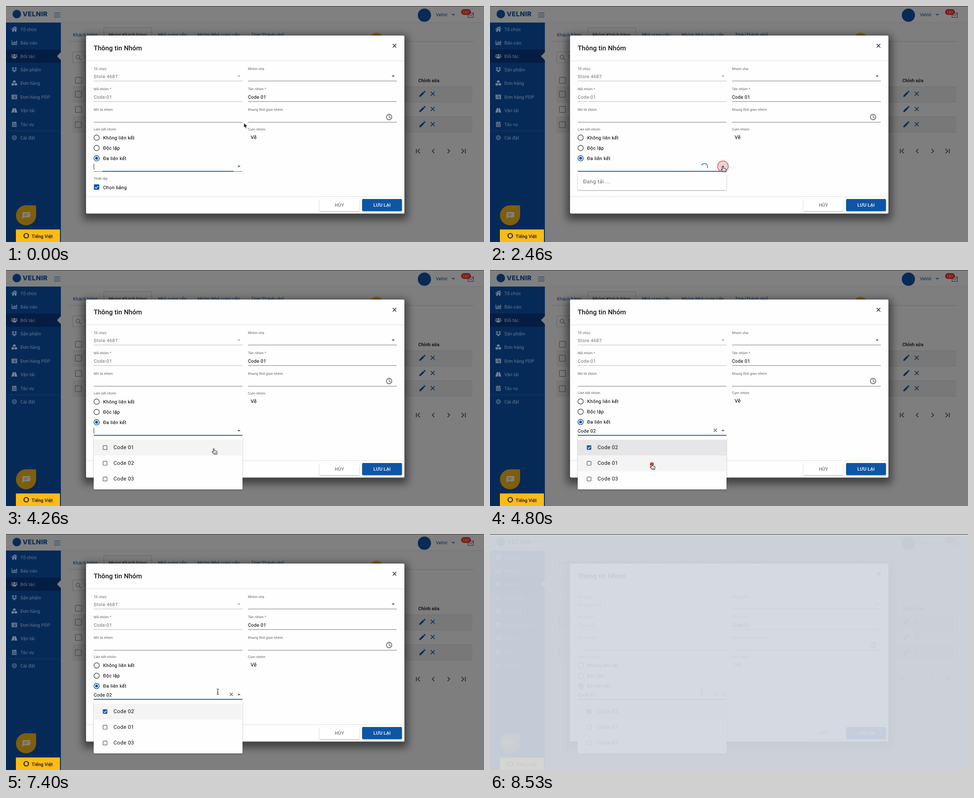
These frames come from a looping animation (1063x527 px, 8600 ms). An HTML page:

```html
<!DOCTYPE html>
<html lang="vi">
<head>
<meta charset="utf-8">
<title>Thông tin Nhóm</title>
<style>
html, body { margin: 0; width: 100%; height: 100%; overflow: hidden; background: #7e7e7e; }
svg { display: block; width: 100%; height: 100%; }
text { font: 10.33px Roboto, sans-serif; fill: #151515; text-rendering: geometricPrecision; }
.side { fill: #64778f; }
.link { fill: #072b56; }
.head { font-weight: 700; }
.title { font-size: 14.76px; font-weight: 500; letter-spacing: .08px; }
.label { font-size: 7.75px; letter-spacing: .12px; fill: #606060; }
.val { letter-spacing: .37px; stroke: #151515; stroke-width: .15px; }
.off { letter-spacing: .37px; fill: #707070; }
.opt { font-size: 11.8px; letter-spacing: .37px; }
.btn { font-weight: 500; letter-spacing: .1px; text-anchor: middle; }
.badge { font-size: 8.3px; fill: #868080; text-anchor: middle; }
.line { fill: none; stroke: currentColor; }
.spin { animation: spin 860ms linear infinite; }
@keyframes spin { to { transform: rotate(360deg); } }
</style>
</head>
<body>
<svg id="stage" viewBox="0 0 1063 527" preserveAspectRatio="none"></svg>
<script>
const LOOP = 8600, BLUE = '#0d55a5', NAVY = '#072b56', PAGE = '#7e7e7e', MUSTARD = '#7f5e0b';

// Drawing helpers
const text = (x, y, s, cls = 'val', extra = '') => `<text x="${x}" y="${y}" class="${cls}" ${extra}>${s}</text>`;
const rect = (x, y, w, h, fill, extra = '') => `<rect x="${x}" y="${y}" width="${w}" height="${h}" fill="${fill}" ${extra}/>`;
const dot = (x, y, r, fill, extra = '') => `<circle cx="${x}" cy="${y}" r="${r}" fill="${fill}" ${extra}/>`;
const ring = (x, y, r, color, width = 1) => dot(x, y, r, 'none', `stroke="${color}" stroke-width="${width}"`);
const path = (d, color, width = 1, extra = '') => `<path d="${d}" class="line" color="${color}" stroke-width="${width}" ${extra}/>`;
const solid = (d, fill, extra = '') => `<path d="${d}" fill="${fill}" ${extra}/>`;
const at = (x, y, body) => `<g transform="translate(${x} ${y})">${body}</g>`;
const group = (id, body) => `<g id="${id}">${body}</g>`;
const shade = (x, y, w, h, blur, opacity) => rect(x, y, w, h, '#000', `rx="3" opacity="${opacity}" filter="url(#${blur})"`);
const cross = (x, y, r, color, width) => path(`M${x - r} ${y - r}l${2 * r} ${2 * r}m0 ${-2 * r}l${-2 * r} ${2 * r}`, color, width);
const arrow = (x, y, color = '#555', dir = 1) => solid(`M${x - 3.5} ${y - 1.7 * dir}h7l-3.5 ${3.5 * dir}z`, color);
const box = (x, y, r, color, width) => rect(x - r, y - r, 2 * r, 2 * r, 'none', `rx="1" stroke="${color}" stroke-width="${width}"`);
const tick = (x, y, s) => rect(x - 6 * s, y - 6 * s, 12 * s, 12 * s, BLUE, 'rx="1.3"') +
  path(`M${x - 3.6 * s} ${y + .2 * s}l${2.6 * s} ${2.6 * s}l${4.8 * s} ${-5.2 * s}`, '#fff', 1.4);

// Sidebar icons, centred on 0,0
const person = (x, y, r) => `M${x - r} ${y}a${r} ${r} 0 1 1 ${2 * r} 0a${r} ${r} 0 1 1 ${-2 * r} 0z`;
const menuItems = [
  [52, 'Tổ chức', 'M-7 0L0-6 2.5-4V-6H4.5V-2.2L7 0 6 1 0-4-6 1zM-4.5 1L0-2.8 4.5 1V5.5H1.2V2H-1.2V5.5H-4.5z'],
  [82, 'Báo cáo', 'M-6-5h1.4V3.6H6V5H-6zM-3.5-.5h1.8V2.6h-1.8zM-.8-3H1V2.6H-.8zM1.9-1.5h1.8V2.6H1.9zM4.4-4.5H6V2.6H4.4z'],
  [112, 'Đối tác', person(0, -2.5, 2.3) + person(-4.7, -2.7, 1.5) + person(4.7, -2.7, 1.5) + 'M-4 5V3Q-4 .6-1.5.6h3Q4 .6 4 3V5zM-7 2Q-7-.5-4-.5L-3 0Q-5 1-5 2.5H-7zM7 2Q7-.5 4-.5L3 0Q5 1 5 2.5H7z'],
  [142, 'Sản phẩm', 'M-3-5.5L0-3.5-3-1.5-6-3.5zM3-5.5L6-3.5 3-1.5 0-3.5zM-3-1L0 1-3 3-6 1zM3-1L6 1 3 3 0 1zM0 2L3 4 0 6-3 4z'],
  [172, 'Đơn hàng', 'M0-6L3-4.8V-1.5L0-.3-3-1.5V-4.8zM-3.3 0L-.4 1.2V4.6L-3.3 6-6.3 4.6V1.2zM3.3 0L6.3 1.2V4.6L3.3 6 .4 4.6V1.2z'],
  [203, 'Đơn hàng PDP', 'M-6-5H6V5H-6zM-4-3V-1.8H-2.8V-3zM-1.5-3V-1.8H4V-3zM-4-.6V.6H-2.8V-.6zM-1.5-.6V.6H4V-.6zM-4 1.8V3H-2.8V1.8zM-1.5 1.8V3H4V1.8z'],
  [233, 'Vận tải', 'M-3.5-5H-.6V-3H.6V-5H3.5L6.5 5H.8V2H-.8V5H-6.5zM-.6-1.5V.6H.6V-1.5z'],
  [264, 'Tác vụ', 'M-5-4.5H-3.5V-6H-2V-4.5H2V-6H3.5V-4.5H5V-2.5H-5zM-5-1.7H5V6H-5zM-3.5-.5V1.2H-1.2V-.5zM-.5-.5V1.2H1.3V-.5zM2-.5V1.2H3.8V-.5zM-3.5 2.5V4.5H-1.2V2.5zM-.5 2.5V4.5H1.3V2.5zM2 2.5V4.5H3.8V2.5z'],
];
const gear = dot(0, 0, 4.6, 'none', 'stroke="#64778f" stroke-width="1.6" stroke-dasharray="2.2 1.4"') +
  ring(0, 0, 4, '#64778f') + ring(0, 0, 1.6, '#64778f');

const header = () => rect(0, 0, 1063, 37, '#808080') + rect(0, 36.5, 1063, 1, '#747474') +
  dot(24, 18, 9.5, NAVY) + text(37, 22.5, 'VELNIR', 'link', 'style="font:800 14.5px Inter,sans-serif;letter-spacing:.4px"') +
  path('M107 15.5h14M107 20h14M107 24.5h14', NAVY) +
  dot(930.5, 20.5, 14.7, NAVY) + text(956, 22.7, 'Velnir', 'link') +
  path('M991.7 17.5l3 3 3-3', NAVY, 1.4) +
  rect(1027.5, 15.5, 12, 10, 'none', `stroke="${NAVY}"`) + path('M1028 17l5.5 5 5.5-5', NAVY) +
  rect(1012, 7, 22, 13, '#7c1a14', 'rx="6.5"') + text(1022.5, 16.5, '187', 'badge');

const sidebar = () => rect(0, 37, 122, 490, '#062a58') + rect(0, 97, 122, 30, '#041e43') +
  solid('M122 103v18l-8.5-9z', PAGE) + rect(0, 278, 122, 1, '#173a66') +
  menuItems.map(([y, s, d]) => at(18.5, y, solid(d, '#748297', 'fill-rule="evenodd"')) + text(32, y + 3.7, s, 'side')).join('') +
  at(18.5, 294, gear) + text(32, 297.7, 'Cài đặt', 'side');

const pencil = 'M3 17.25V21h3.75L17.81 9.94l-3.75-3.75zM20.71 7.04a1 1 0 0 0 0-1.41l-2.34-2.34a1 1 0 0 0-1.41 0l-1.83 1.83 3.75 3.75z';
const page = () => rect(137, 78.5, 903, 1, '#6a6a6a') +
  path('M217.5 79V48.5H324V79', '#646464') +
  text(149, 67.7, 'Khách hàng', 'link') + text(228, 67.7, 'Nhóm Khách hàng', '') +
  text(338, 67.7, 'Nhà cung cấp', 'link') + text(426, 67.7, 'Nhóm Nhà cung cấp', 'link') +
  text(545, 67.7, 'Tỉnh/Thành phố', 'link') + dot(824, 75, 15, MUSTARD) +
  rect(148.5, 102.5, 200, 24, 'none', 'stroke="#686868"') +
  ring(160, 114, 4, '#4c4c4c', 1.4) + path('M163 117l4 4', '#4c4c4c', 1.6) + text(173, 118, 'Tìm', '', 'fill-opacity=".5"') +
  rect(148, 180, 889, 34, '#787878') + rect(148, 247, 889, 34, '#787878') +
  [180, 214, 247, 281].map(y => rect(148, y, 889, 1, '#6e6e6e')).join('') +
  [166, 197, 231, 265].map(y => box(161, y, 6.7, '#484848', 1.2)).join('') +
  text(917, 169.7, 'Chỉnh sửa', 'head') +
  [196, 230, 264].map(y => at(917, y - 9, solid(pencil, NAVY, 'transform="scale(.75)"')) + cross(949, y, 4.5, NAVY, 1.6)).join('') +
  path('M912.5 319v10M920.5 319l-5 5 5 5M952.5 319.5l-4.5 4.5 4.5 4.5M982 319.5l4.5 4.5-4.5 4.5M1013 319l5 5-5 5M1021.5 319v10', '#1c1c1c', 1.5);

const badges = () => solid('M44.5 445H64q3 0 3 3v19a22.4 22.4 0 1 1-22.5-22z', MUSTARD) +
  solid('M39 460h13q2 0 2 2v8q0 2-2 2H40l-3.5 3.5V462q0-2 2.5-2z', '#808080') + path('M40 464.5h10M40 468h7', MUSTARD, 1.3) +
  rect(22, 499, 98, 28, '#fdbb15') + ring(45, 513, 5, '#1c1c1c', 2.2) +
  text(57, 518, 'Tiếng Việt', '', 'style="font-weight:500"');

const rule = (x, y, dashed) => path(`M${x} ${y}h331`, dashed ? '#999' : '#777', 1, dashed ? 'stroke-dasharray="2 1"' : '');
const radio = (y, s, on) => ring(201.5, y, 6, on ? BLUE : '#555', 1.5) + (on ? dot(201.5, y, 3.2, BLUE) : '') + text(216, y + 3.7, s);
const button = (x, w, fill, color, s) => shade(x, 432.5, w, 26.5, 'thin', .35) + rect(x, 431, w, 27, fill, 'rx="2"') +
  text(x + w / 2, 448.3, s, 'btn', `style="fill:${color}"`);

const modal = () => shade(171, 66, 722, 411, 'soft', .5) + rect(178, 66, 708, 397.5, '#fefefe', 'rx="3"') +
  text(195, 99, 'Thông tin Nhóm', 'title') + cross(864, 88.7, 4, '#222', 1.4) +
  rect(178, 122, 708, 1, '#e0e0e0') + rect(178, 425, 708, 1, '#e0e0e0') +
  text(195, 143, 'Tổ chức', 'label') + text(195, 160.7, 'Store 4687', 'off') + arrow(518, 157, '#aaa') + rule(195, 167.5, true) +
  text(538, 143, 'Nhóm cha', 'label') + arrow(861, 157) + rule(538, 167.5) +
  text(195, 187.5, 'Mã nhóm *', 'label') + text(195, 206.7, 'Code-01', 'off') + rule(195, 213.5, true) +
  text(538, 187.5, 'Tên nhóm *', 'label') + text(538, 206.7, 'Code 01') + rule(538, 213.5) +
  text(195, 233.5, 'Mô tả nhóm', 'label') + rule(195, 259.5) +
  text(538, 233.5, 'Khung thời gian nhóm', 'label') + rule(538, 259.5) +
  ring(852, 248, 6, '#444', 1.3) + path('M852 244v4.3l3 2', '#444', 1.2) +
  group('choices', text(195, 278, 'Liên kết nhóm', 'label') + text(538, 278, 'Cụm nhóm', 'label') +
    text(544, 297, 'Vẽ', 'val', 'style="font-size:11.3px"') +
    radio(294, 'Không liên kết') + radio(317, 'Độc lập') + radio(340, 'Đa liên kết', true)) +
  rule(195, 369.5) + group('focus', rect(195, 368.3, 331, 1.8, BLUE)) +
  text(195, 388, 'Thiết lập', 'label') + tick(201.5, 404.3, 1) + text(216, 408.5, 'Chọn bảng') +
  button(697, 89, '#fff', '#777', 'HỦY') + button(792, 88.5, BLUE, '#fff', 'LƯU LẠI');

const panel = h => shade(195, 374, 331, h, 'thin', .4) + rect(195, 373, 331, h, '#fefefe', 'rx="2"');
const row = (id, y, fill) => group(id, rect(195, y, 331, 35.2, fill));
const options = (names, checked) => names.map((s, i) => {
  const y = 396.5 + 35.1 * i;
  return (i === checked ? tick(220.3, y, .82) : box(220.3, y, 4.4, '#555', 1.2)) + text(239, y + 3.7, s, 'opt');
}).join('');

const select = () => group('ripple', dot(518, 358, 9, '#e9e9e9')) +
  group('closed', arrow(518, 358.5)) + group('open', arrow(518, 358, '#555', -1)) +
  group('caretEmpty', rect(195, 352.5, 1, 12.5, '#222')) +
  group('chosen', text(195, 362.5, 'Code 02') + cross(501, 358, 3.5, '#555', 1.2)) +
  group('caretEnd', rect(238.5, 352.5, 1, 12.5, '#222')) +
  group('loading', at(477, 358.5, `<g class="spin">${path('M-2.4-6.6A7 7 0 1 1 1.2 6.9', BLUE, 1.4)}</g>`) +
    panel(38) + text(207, 396, 'Đang tải ...', 'opt', 'style="fill:#666"')) +
  group('list', panel(117) + row('rowTop', 379, '#f4f4f4') + row('rowPicked', 379, '#e6e6e8') + row('rowMid', 414.2, '#f4f4f4') +
    group('before', options(['Code 01', 'Code 02', 'Code 03'])) +
    group('after', options(['Code 02', 'Code 01', 'Code 03'], 0)));

const click = (id, x, y) => dot(x, y, 3, '#f4474e', `id="${id}" stroke="#ee2a34" stroke-width="2.4"`);
const pointer = () => group('pointer',
  group('arrow', solid('M0 0V11l2.5-2.2L4.3 12.7l1.9-.8L4.5 8.2H8z', '#111', 'stroke="#fff" stroke-width=".9"')) +
  group('hand', solid('M-1.5 1Q-1.5 0-.4 0T.8 1V4.5L3 5 5.8 5.7Q7.2 6 7 7.5L6.2 12.5H.3L-3.5 8Q-4.3 6.8-3 6.5L-1.5 7.5z', '#fff', 'stroke="#222" stroke-width="1.1"') +
    path('M1 8.5v2.5M2.8 8.5v2.5M4.5 8.5v2.5', '#222', .8)) +
  group('beam', path('M-2.5-6Q0-6 0-4.5Q0-6 2.5-6M0-4.5V4.5M-2.5 6Q0 6 0 4.5Q0 6 2.5 6M-1.5 1.8h3', '#222', 1.1)));

document.getElementById('stage').innerHTML =
  `<defs><filter id="soft" x="-10%" y="-15%" width="120%" height="130%"><feGaussianBlur stdDeviation="9"/></filter>
  <filter id="thin" x="-5%" y="-20%" width="110%" height="150%"><feGaussianBlur stdDeviation="1.3"/></filter></defs>` +
  rect(0, 0, 1063, 527, PAGE) + header() + page() + sidebar() + badges() + modal() + select() +
  click('clickOpen', 518, 358) + click('clickPick', 360, 433.5) + pointer() +
  group('fade', rect(0, 0, 1063, 527, '#d2d8e0')) + rect(0, 0, 1063, 1, '#3c3c3c');

// Timeline: every part gets keyframes over the same loop
let css = '';
const keys = (id, frames, easing = 'linear') => {
  const body = frames.map(([t, rules]) => `${(t / LOOP * 100).toFixed(3)}%{${rules}}`).join('');
  css += `@keyframes ${id}{${body}}#${id}{animation:${id} ${LOOP}ms ${easing} infinite}`;
};
const show = (id, ...spans) => keys(id,
  [[0, 'opacity:0'], ...spans.flatMap(([a, b]) => [[a, 'opacity:1'], [b, 'opacity:0']])], 'step-end');
const pulse = (id, start) => {
  const look = (r, fill, stroke) => `r:${r}px;fill-opacity:${fill};stroke-opacity:${stroke}`;
  keys(id, [[0, look(3, 0, 0)], [start - 1, look(3, 0, 0)], [start, look(3, .7, 1)],
    [start + 730, look(11.7, .15, .6)], [start + 1060, look(15.5, 0, 0)], [LOOP, look(15.5, 0, 0)]]);
};

const OPEN = 1730, LOADED = 3230, PICK = 4790;
const route = [[0, 529, 261], [360, 529, 261], [1000, 522, 316], [1260, 518, 352], [1460, 518, 358], [3330, 518, 358],
  [3400, 541, 376], [3460, 534, 375], [3880, 534, 375, 'ease-in-out'], [4730, 360, 433], [6350, 360, 433, 'ease-in-out'],
  [6860, 471, 352], [LOOP, 471, 352]];
keys('pointer', route.map(([t, x, y, ease = 'linear']) => [t, `transform:translate(${x}px,${y}px);animation-timing-function:${ease}`]));
show('arrow', [0, 1260], [3390, 4020]);
show('hand', [1260, 3390], [4020, 6760]);
show('beam', [6760, LOOP]);

keys('focus', [[0, 'transform:translate(360.5px) scaleX(.88) translate(-360.5px)'], [130, 'transform:none'], [LOOP, 'transform:none']], 'step-end');
keys('choices', [[0, 'transform:none'], [PICK, 'transform:translateY(-.6px)'], [LOOP, 'transform:translateY(-.6px)']], 'step-end');
show('ripple', [1330, 3400]);
show('closed', [0, OPEN]);
show('open', [OPEN, LOOP]);
show('loading', [OPEN, LOADED]);
show('list', [LOADED, LOOP]);
show('before', [0, PICK]);
show('after', [PICK, LOOP]);
show('chosen', [PICK, LOOP]);
show('rowTop', [4080, 4380], [6660, LOOP]);
show('rowPicked', [PICK, 6660]);
show('rowMid', [4380, 6530]);
show('caretEmpty', ...[0, 1, 2, 3, 4].map(i => [990 * i, 990 * i + 460]));
show('caretEnd', ...[0, 1, 2, 3].map(i => [4840 + 1020 * i, 5360 + 1020 * i]));
pulse('clickOpen', OPEN);
pulse('clickPick', PICK);
keys('fade', [[0, 'opacity:0'], [7600, 'opacity:0'], [LOOP, 'opacity:1']]);

document.head.appendChild(document.createElement('style')).textContent = css;
</script>
</body>
</html>
```
